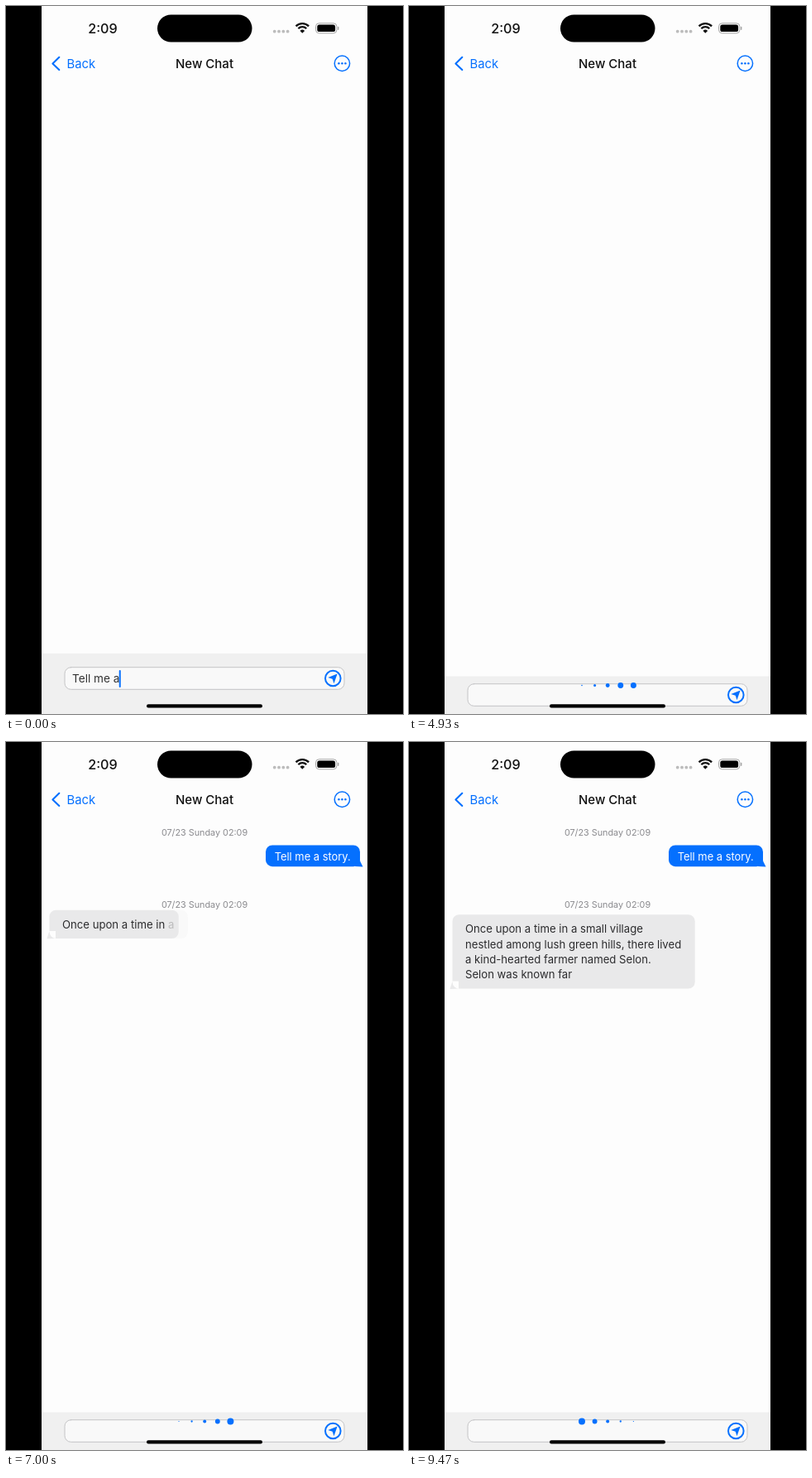
Write an HTML page with a canvas that moves like this. It is 480 by 854 pixels and loops after 9.54 s.

```html
<!DOCTYPE html>
<html lang="en">
<head>
<meta charset="utf-8">
<title>New Chat</title>
<style>
  html, body { margin: 0; width: 100%; height: 100%; overflow: hidden; background: #000; }
  canvas { display: block; width: 480px; height: 854px; }
</style>
</head>
<body>
<canvas id="stage"></canvas>
<script>
const LOOP = 9540, W = 480, H = 854;
const BLUE = '#0570fe', INK = '#2c2c2e', GRAY = '#e9e9ea';
const FONT = 'Inter, "Liberation Sans", sans-serif';

const canvas = document.getElementById('stage');
const ctx = canvas.getContext('2d');
const dpr = window.devicePixelRatio || 1;
canvas.width = W * dpr;
canvas.height = H * dpr;

const PROMPT = 'Tell me a story.';
// [time, typed characters]
const KEYS = [[0, 9], [130, 10], [260, 11], [500, 12], [1000, 13], [1160, 14], [1320, 15], [2700, 16], [4270, 0]];

const LINES = [
  'Once upon a time in a small village',
  'nestled among lush green hills, there lived',
  'a kind-hearted farmer named Selon.',
  'Selon was known far'
].map(line => line.split(' '));
const LATE = [8800, 9020, 9230];

// Every word with its line, the line's text before it, and its start time
const words = [];
LINES.forEach((line, row) => line.forEach((word, col) => {
  const n = words.length;
  const before = line.slice(0, col).join(' ') + (col ? ' ' : '');
  words.push({ word, row, before, start: n < 21 ? 6440 + 106 * n : LATE[n - 21] });
}));

const clamp = v => Math.max(0, Math.min(1, v));
const ramp = (t, from, to) => clamp((t - from) / (to - from));
const smooth = u => u * u * (3 - 2 * u);
const mix = (a, b, u) => a + (b - a) * u;

function setFont(size, weight = 400) {
  ctx.font = `${weight} ${size}px ${FONT}`;
}

function text(str, x, y, size, color, weight = 400, align = 'left') {
  setFont(size, weight);
  ctx.fillStyle = color;
  ctx.textAlign = align;
  ctx.fillText(str, x, y);
}

function box(x, y, w, h, r, color) {
  ctx.beginPath();
  ctx.roundRect(x, y, w, h, r);
  ctx.fillStyle = color;
  ctx.fill();
}

function dot(x, y, r, color) {
  ctx.beginPath();
  ctx.arc(x, y, r, 0, 7);
  ctx.fillStyle = color;
  ctx.fill();
}

function ring(x, y, r, width, color) {
  ctx.beginPath();
  ctx.arc(x, y, r, 0, 7);
  ctx.lineWidth = width;
  ctx.strokeStyle = color;
  ctx.stroke();
}

function poly(points, color) {
  ctx.beginPath();
  points.forEach(([x, y]) => ctx.lineTo(x, y));
  ctx.closePath();
  ctx.fillStyle = color;
  ctx.fill();
}

function faded(alpha, draw) {
  if (alpha <= 0) return;
  ctx.save();
  ctx.globalAlpha *= alpha;
  draw();
  ctx.restore();
}

function statusBar() {
  text('2:09', 117, 33, 16.2, '#111', 500, 'center');
  box(183, 10.5, 114.5, 33, 16.5, '#000');
  for (let i = 0; i < 4; i++) dot(324.7 + i * 5.3, 30.7, 1.9, '#bcbcbc');

  ctx.strokeStyle = '#111';
  ctx.lineWidth = 2.3;
  for (const r of [7, 11]) {
    ctx.beginPath();
    ctx.arc(358.3, 32.2, r, -Math.PI * .75, -Math.PI * .25);
    ctx.stroke();
  }
  ctx.beginPath();
  ctx.moveTo(358.3, 32.8);
  ctx.arc(358.3, 32.8, 4, -Math.PI * .75, -Math.PI * .25);
  ctx.fillStyle = '#111';
  ctx.fill();

  ctx.beginPath();
  ctx.roundRect(374.5, 20.8, 25.4, 12, 4);
  ctx.lineWidth = 1;
  ctx.strokeStyle = '#a5a5a5';
  ctx.stroke();
  box(376.3, 22.5, 21.8, 8.6, 2.6, '#000');
  box(401, 24.7, 1.4, 4.2, .7, '#a5a5a5');
}

function navBar() {
  ctx.beginPath();
  ctx.moveTo(64.3, 61.8);
  ctx.lineTo(56.4, 69.4);
  ctx.lineTo(64.3, 77);
  ctx.lineWidth = 2.1;
  ctx.lineCap = ctx.lineJoin = 'round';
  ctx.strokeStyle = BLUE;
  ctx.stroke();
  text('Back', 73.5, 74.6, 14.8, BLUE);
  text('New Chat', 240, 74.6, 15, '#111', 500, 'center');
  ring(406.4, 69.3, 9.2, 1.5, BLUE);
  for (const dx of [-4, 0, 4]) dot(406.4 + dx, 69.3, 1.25, BLUE);
}

function caretAlpha(t) {
  if (t >= 4270) return 0;
  if (t < 2470) return 1 - ramp(t, 1800, 1930);
  return 1 - ramp(t, 3200, 3330) + ramp(t, 3550, 3730);
}

function inputBar(t) {
  const slide = smooth(ramp(t, 4270, 4550));
  const y = mix(811, 831, slide);
  const top = mix(781, 808.5, slide);
  ctx.fillStyle = '#f0f0f0';
  ctx.fillRect(43, top, 394, H - top);

  ctx.beginPath();
  ctx.roundRect(71, y - 13.3, 338, 26.6, 7.5);
  ctx.fillStyle = '#f9f9f9';
  ctx.fill();
  ctx.lineWidth = 1;
  ctx.strokeStyle = '#c4c4c6';
  ctx.stroke();

  const count = KEYS.filter(k => k[0] <= t).pop()[1];
  const typed = PROMPT.slice(0, count);
  text(typed, 80, y + 5, 13.6, '#333');
  const end = 80 + ctx.measureText(typed).width;
  faded(caretAlpha(t), () => box(end - .6, y - 10, 2, 21, 1, BLUE));

  const color = t >= 4130 && t < 4270 ? '#2f90fb' : BLUE;
  ring(395.3, y, 9.3, 2, color);
  const plane = [[5.3, -5.6], [1.2, 6.2], [-.6, .8], [-6, -1]];
  poly(plane.map(([dx, dy]) => [395.3 + dx, y + dy]), color);
}

// Position of the largest dot, on a cycle of 8
function peak(t) {
  if (t < 7000) return .85 + (t - 5600) * .00796;
  if (t < 8600) return 12 + (t - 7000) * .00944;
  return 27.1 + (t - 8600) * .00563;
}

function loader(t) {
  const p = ((peak(t) % 8) + 8) % 8;
  for (let i = 0; i < 5; i++) {
    const gap = Math.abs(i - p);
    const d = Math.min(gap, 8 - gap);
    dot(209 + i * 15.6, 819.5, .6 + 3.4 * Math.pow(1 - d / 4, 1.3), BLUE);
  }
}

function stamp(y) {
  text('07/23 Sunday 02:09', 240, y + 4, 10.8, '#8a8a8e', 400, 'center');
}

function question(y) {
  box(314, y, 114, 25.7, 8, BLUE);
  poly([[424, y + 16], [428, y + 19], [431.5, y + 26], [422, y + 25.5]], BLUE);
  text('Tell me a story.', 370.7, y + 18, 12.9, '#fff', 400, 'center');
}

function bubble(y, w, h) {
  const b = y + h;
  ctx.beginPath();
  ctx.roundRect(52.5, y, w, h, 8);
  ctx.moveTo(52.5, b - 9);
  ctx.lineTo(49.5, b + .3);
  ctx.lineTo(60, b);
  ctx.lineTo(60, b - 9);
  ctx.closePath();
  ctx.fillStyle = GRAY;
  ctx.fill();
}

const TEXT_SIZE = 13.15, PITCH = 18.35;

function replySize(n) {
  if (!n) return [31, 31];
  setFont(TEXT_SIZE);
  const shown = words.slice(0, n);
  const wide = Math.max(...shown.map(w => ctx.measureText(w.before + w.word).width));
  return [wide + 32, 16 + PITCH * (shown[n - 1].row + 1)];
}

function reply(t) {
  const n = words.filter(w => w.start <= t).length;
  const fade = n ? ramp(t, words[n - 1].start, words[n - 1].start + 130) : 1;
  const y = mix(mix(204, 202.7, smooth(ramp(t, 5620, 5800))), 208.2, smooth(ramp(t, 9270, 9400)));
  if (fade < 1) bubble(y, ...replySize(n - 1));
  faded(fade, () => bubble(y, ...replySize(n)));
  setFont(TEXT_SIZE);
  for (const w of words.slice(0, n)) {
    const x = 68 + ctx.measureText(w.before).width;
    faded(ramp(t, w.start, w.start + 130), () =>
      text(w.word, x, y + 22 + w.row * PITCH, TEXT_SIZE, INK));
  }
}

function messages(t) {
  const settle = smooth(ramp(t, 5620, 5800));
  faded(ramp(t, 5270, 5400), () => {
    stamp(109);
    question(mix(115.2, 124.5, settle));
  });
  faded(ramp(t, 5480, 5620), () => {
    stamp(mix(198, 196, settle));
    reply(t);
  });
}

function draw(t) {
  ctx.setTransform(dpr, 0, 0, dpr, 0, 0);
  ctx.lineCap = 'butt';
  ctx.fillStyle = '#000';
  ctx.fillRect(0, 0, W, H);
  ctx.fillStyle = '#fdfdfd';
  ctx.fillRect(43, 0, 394, H);
  statusBar();
  navBar();
  messages(t);
  inputBar(t);
  if (t >= 4270) loader(t);
  box(170, 842.3, 140, 4.2, 2.1, '#000');
}

const origin = performance.now();
function tick() {
  draw((performance.now() - origin) % LOOP);
  requestAnimationFrame(tick);
}
tick();
</script>
</body>
</html>
```
